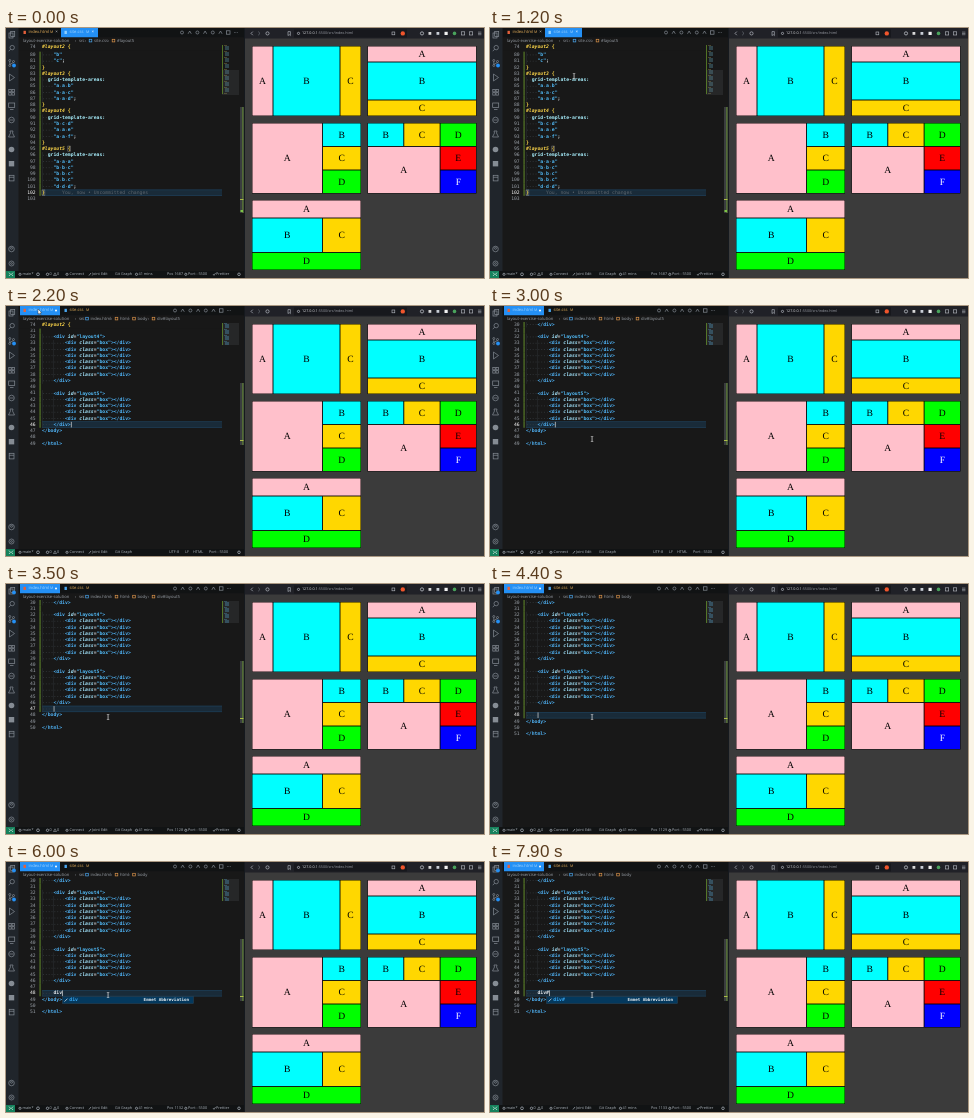
Write an HTML page with a canvas that moves like this. It is 478 px wide and 250 px high and loops after 8 s.

```html
<!DOCTYPE html>
<html lang="en">
<head>
<meta charset="utf-8">
<title>Grid layout exercise</title>
<style>
html, body { margin: 0; width: 100%; height: 100%; overflow: hidden; background: #181818; }
canvas { display: block; width: 478px; height: 250px; }
</style>
</head>
<body>
<canvas id="stage"></canvas>
<script>
const W = 478, H = 250, LOOP = 8000;
const canvas = document.getElementById('stage');
const ctx = canvas.getContext('2d');
const dpr = window.devicePixelRatio || 1;
canvas.width = W * dpr;
canvas.height = H * dpr;

const MONO = '"DejaVu Sans Mono", monospace';
const SANS = '"Open Sans", "Noto Sans", sans-serif';
const SERIF = '"Liberation Serif", serif';
const CHAR = 2.87, LINE = 6.27, LEFT = 36;
const col = {
  editor: '#181818', bar: '#20252b', line: '#1f4766', num: '#9aa0a8', dim: '#5c666e',
  tag: '#4fb2f5', attr: '#a3e6ff', str: '#52bdfa', sel: '#ffd84a', prop: '#a6ecfa',
  text: '#dfe5ea', icon: '#858c94', blue: '#2490f5', git: '#6b9a2c'
};

const rect = (x, y, w, h, c) => { ctx.fillStyle = c; ctx.fillRect(x, y, w, h); };

function text(s, x, y, c, font, align = 'left') {
  ctx.font = font;
  ctx.fillStyle = c;
  ctx.textAlign = align;
  ctx.textBaseline = 'middle';
  ctx.fillText(s, x, y);
}
const ui = (s, x, y, c = col.num, size = 4.1) => text(s, x, y, c, `${size}px ${SANS}`);

function code(s, column, y, c, style = 'bold') {
  text(s, LEFT + column * CHAR, y, c, `${style} 4.77px ${MONO}`);
}

function path(points, c, width = 0.7, fill) {
  ctx.beginPath();
  points.forEach(([x, y], i) => i ? ctx.lineTo(x, y) : ctx.moveTo(x, y));
  if (fill) { ctx.closePath(); ctx.fillStyle = fill; ctx.fill(); }
  if (c) { ctx.strokeStyle = c; ctx.lineWidth = width; ctx.stroke(); }
}

function ring(x, y, r, c, fill) {
  ctx.beginPath();
  ctx.arc(x, y, r, 0, Math.PI * 2);
  if (fill) { ctx.fillStyle = c; ctx.fill(); }
  else { ctx.strokeStyle = c; ctx.lineWidth = 0.7; ctx.stroke(); }
}

function frame(x, y, w, h, c, width = 0.7) {
  ctx.strokeStyle = c;
  ctx.lineWidth = width;
  ctx.strokeRect(x, y, w, h);
}

// ---- documents ----
function rule(n, rows) {
  return [`#layout${n} {`, '  grid-template-areas:',
    ...rows.map((r, i) => `    "${r}"${i === rows.length - 1 ? ';' : ''}`), '}'];
}
const css = ['    "b"', '    "c";', '}',
  ...rule(3, ['a a b', 'a a c', 'a a d']),
  ...rule(4, ['b c d', 'a a e', 'a a f']),
  ...rule(5, ['a a a', 'b b c', 'b b c', 'b b c', 'd d d']), ''];

function block(n, count) {
  return [`    <div id="layout${n}">`,
    ...Array(count).fill('        <div class="box"></div>'), '    </div>'];
}
function markup(extra) {
  return ['    </div>', '', ...block(4, 6), '', ...block(5, 4), ...extra, '</body>', '', '</html>'];
}

// ---- syntax colours ----
const tokens = /(<\/?\w+|\/?>)|(#\w+)|("[^"]*")|([\w-]+(?==))|([\w-]+:)|(\S)/g;
const shades = [col.tag, col.sel, col.str, col.attr, col.prop, col.text];
const dot = (column, y, c) => rect(LEFT + (column + 0.35) * CHAR, y - 0.3, 0.8, 0.8, c);

function codeLine(s, y) {
  const indent = s.length - s.trimStart().length;
  for (let i = 0; i < indent; i++) dot(i, y, '#3a4045');
  for (let i = 0; i < indent; i += 4) rect(LEFT + i * CHAR, y - LINE / 2, 0.4, LINE, '#34393d');
  if (/^ +div/.test(s)) return code(s.trim(), indent, y, col.text);
  for (const m of s.matchAll(tokens)) {
    const kind = m.slice(1).findIndex(Boolean);
    const italic = kind === 1 || kind === 3;
    const c = m[0] === '{' || m[0] === '}' ? col.sel : shades[kind];
    code(m[0], m.index, y, c, italic ? 'italic bold' : 'bold');
    if (kind === 2) [...m[0]].forEach((ch, i) => {
      if (ch === ' ') dot(m.index + i, y, '#3b7396');
    });
  }
}

function lineNumber(n, y, active) {
  text(n, 29.6, y, active ? '#ffffff' : col.num, `4.7px ${MONO}`, 'right');
}

function drawCode(lines, first, top, active) {
  lines.forEach((s, i) => {
    const n = first + i, y = top + i * LINE;
    if (n === active) {
      rect(LEFT, y - 3.1, 180, 6.2, '#192b39');
      rect(LEFT, y - 3.1, 180, 0.5, col.line);
      rect(LEFT, y + 2.7, 180, 0.5, col.line);
    }
    if (n <= active) rect(33.6, y - LINE / 2, 0.9, LINE, col.git);
    lineNumber(n, y, n === active);
    codeLine(s, y);
  });
}

const caret = (column, y) => rect(LEFT + column * CHAR + 0.2, y - 2.8, 0.7, 5.6, '#d8d8d8');
const bracket = (column, y) => frame(LEFT + column * CHAR, y - 2.8, CHAR, 5.6, '#8a8a8a', 0.5);

function sticky() {
  rect(13, 16, 203, 6.6, col.editor);
  lineNumber(74, 19, false);
  codeLine('#layout2 {', 19);
}

// ---- editor chrome ----
function activityBar(unsaved) {
  rect(0, 0, 12.5, 243, col.bar);
  const c = col.icon, x = 5.5;
  frame(3, 5, 4, 5, c); frame(4.7, 3.4, 4, 5, c);
  if (unsaved) ring(8, 8.5, 1.9, col.blue, true);
  ring(6.2, 19.6, 2.2, c); path([[4.6, 21.2], [2.8, 23.2]], c);
  ring(3.8, 32.5, 1, c); ring(3.8, 37.5, 1, c); ring(7.5, 33.5, 1, c);
  path([[3.8, 33.5], [3.8, 36.5], [7.5, 34.5]], c);
  ring(8, 37.5, 1.9, col.blue, true);
  path([[3.5, 46], [8.5, 49.5], [3.5, 53], [3.5, 46]], c);
  for (const [dx, dy] of [[0, 0], [3.2, 0], [0, 3.2], [3.2, 3.2]]) frame(2.8 + dx, 61.5 + dy, 2.4, 2.4, c);
  frame(2.7, 75, 6, 4.5, c); path([[4, 81.5], [7.5, 81.5]], c);
  ring(x, 92, 2.8, c); path([[3.5, 92], [7.5, 92]], c);
  path([[4, 103], [7, 103], [6.5, 105], [8.5, 109], [2.5, 109], [4.5, 105], [4, 103]], c);
  ring(x, 121.5, 2.8, c, true);
  rect(2.8, 133, 5.4, 5.4, c);
  frame(3.2, 147.3, 4.8, 5.6, c); path([[3.2, 149.3], [8, 149.3]], c);
  ring(x, 221, 2.8, c); ring(x, 220.3, 1, c);
  ring(x, 235.5, 2.5, c); ring(x, 235.5, 0.9, c);
}

function tabs(html, hover) {
  rect(12.5, 0, 225.5, 9.5, '#111314');
  if (html) rect(14, 0, 40, 9.5, col.blue);
  else rect(55, 0, 37, 9.5, col.blue);
  if (hover && !html) rect(14, 0, 41, 9.5, '#252a2e');
  const lit = '#a4d6ff', changed = '#e8b05a';
  rect(17.5, 2.8, 2.4, 3.2, '#e5603a');
  ui('index.html', 22.5, 4.3, html ? lit : changed, 4.2);
  ui('M', 44, 4.3, html ? lit : changed, 3.6);
  if (html) ring(50, 4.4, 1, '#ffffff', true);
  else ui('×', 49.3, 4.3, '#c8ccd0', 4.5);
  rect(58.5, 2.8, 2.4, 3.2, html ? '#4aa6ee' : '#8fd0ff');
  ui('site.css', 63.5, 4.3, html ? changed : lit, 4.2);
  ui('M', 80, 4.3, html ? changed : lit, 3.6);
  if (!html) ui('×', 85.5, 4.3, '#ffffff', 4.5);
  const start = html ? 169 : 176;
  for (let i = 0; i < 8; i++) {
    const x = start + i * 7.7;
    if (i === 6) frame(x - 1.6, 2.8, 3.4, 3.4, col.icon);
    else if (i === 7) for (let d = -1.4; d < 2; d += 1.4) ring(x + d, 4.5, 0.4, col.icon, true);
    else if (i % 2) path([[x - 1.6, 5.8], [x, 3], [x + 1.6, 5.8]], col.icon);
    else ring(x, 4.5, 1.5, col.icon);
  }
}

function breadcrumb(parts) {
  rect(12.5, 9.5, 225, 6.5, col.editor);
  parts.forEach(([s, x], i) => {
    if (i) ui('›', x - (i > 1 ? 9 : 4.3), 12.6);
    if (i > 1) frame(x - 4.8, 11.3, 2.6, 2.6, i === 2 ? '#4aa6ee' : '#d9924a');
    ui(s, x, 12.7, col.num, 4.2);
  });
}

function statusBar(pos) {
  rect(0, 243, 238, 7, '#111314');
  const y = 246.3, c = '#aeb5bd';
  rect(0, 243, 9, 7, '#16825d');
  path([[3, 244.6], [4.5, 246.3], [3, 248]], '#ffffff', 0.6);
  path([[7, 244.6], [5.5, 246.3], [7, 248]], '#ffffff', 0.6);
  ring(14, y, 1.1, c);
  const items = [['main*', 16.5], ['0', 43.5], ['0', 51], ['Connect', 63.5],
    ['Joint Edit', 86], ['Git Graph', 109]];
  if (pos) items.push(['41 mins', 132.5], [`Pos ${pos}`, 161], ['Port : 5500', 182], ['Prettier', 210]);
  else items.push(['UTF-8', 163], ['LF', 179], ['HTML', 187], ['Port : 5500', 203]);
  items.forEach(([s, x]) => ui(s, x, y, c, 3.8));
  ring(32, y, 1.4, c);
  ring(41.5, y, 1.2, c);
  path([[47.5, 247.5], [49, 244.8], [50.5, 247.5], [47.5, 247.5]], c, 0.5);
  ring(61, y, 1.1, c);
  path([[83, 247.5], [85, 245]], c);
  if (pos) {
    ring(130.5, y, 1.1, c);
    ring(179.8, y, 1.1, c);
    path([[207, 246], [208, 247.4], [209.6, 245]], c, 0.6);
  }
  ring(233, y, 1.3, c);
}

function minimap(html) {
  const rows = html ? 22 : 49;
  for (let i = 0; i < rows; i++) {
    if (i % 6 === 5) continue;
    const head = i % 6 === 0;
    rect(218 + (head ? 0 : 1), 17 + i, head ? 3 : 4 + (i * 3) % 3, 0.5,
      html ? '#3a7797' : head ? '#7d7440' : '#46717c');
  }
  rect(216, html ? 17 : 42, 17, html ? 22 : 25, 'rgba(130,140,150,.13)');
  rect(216, 17, 0.7, rows, col.git);
  rect(234, html ? 77 : 79, 4, html ? 62 : 106, '#3a3d3f');
  rect(236.5, html ? 77 : 79, 0.8, html ? 62 : 106, col.git);
  rect(234, html ? 134 : 171, 3.5, 0.9, '#b9c94a');
  if (!html) rect(234.5, 182, 2.5, 2, '#7cc447');
}

function popup(word, y) {
  rect(56.5, y, 131, 7, '#04395e');
  frame(56.5, y, 131, 7, '#2c4456', 0.5);
  path([[58.5, y + 5], [61.5, y + 2]], '#d0d8e0', 0.8);
  text(word, 63.3, y + 3.5, '#3aa9f5', `bold 4.77px ${MONO}`);
  text('Emmet Abbreviation', 183, y + 3.5, '#e4ebf0', `bold 4.2px ${MONO}`, 'right');
}

// ---- browser ----
const fills = { A: '#ffc0cb', B: '#00ffff', C: '#ffd700', D: '#00ff00', E: '#ff0000', F: '#0000ff' };

function grid(x, y, cells) {
  cells.forEach(([name, x0, y0, x1, y1]) => {
    const w = x1 - x0, h = y1 - y0, edge = 0.45;
    rect(x + x0, y + y0, w, h, '#000000');
    rect(x + x0 + edge, y + y0 + edge, w - 2 * edge, h - 2 * edge, fills[name]);
    text(name, x + (x0 + x1) / 2, y + (y0 + y1) / 2 + 0.3,
      name === 'F' ? '#ffffff' : '#000000', `9.6px ${SERIF}`, 'center');
  });
}

function browser() {
  rect(238, 0, 240, 250, '#3b3b3b');
  rect(238, 0, 1, 250, '#15191e');
  rect(239, 0, 239, 10.5, '#202127');
  const c = '#b8bcc4';
  path([[246.8, 3.6], [245, 5.4], [246.8, 7.2]], c);
  path([[252.2, 3.6], [254, 5.4], [252.2, 7.2]], '#6e737c');
  ring(261.5, 5.4, 1.6, c);
  path([[282, 3.6], [284.4, 3.6], [284.4, 7.6], [283.2, 6.5], [282, 7.6], [282, 3.6]], c, 0.6);
  rect(288, 1.5, 113, 8, '#17181d');
  ring(292.5, 5.4, 1.1, c);
  ui('127.0.0.1', 296, 5.3, '#e6e8ec', 3.7);
  ui(':5500/src/index.html', 311.7, 5.3, '#9a9ea6', 3.7);
  frame(386, 4, 2.8, 2.8, c, 0.6);
  ring(396.8, 5.4, 2.2, '#f0552c', true);
  ring(416, 5.4, 1.6, '#cfd3da');
  rect(422.5, 4, 2.8, 2.8, '#d8d8d8');
  rect(430.5, 4, 2.8, 2.8, '#c9ced6');
  rect(438.5, 3.8, 3.2, 3.2, '#f2f2f2');
  ring(448.5, 5.4, 1.8, '#49a35c', true);
  frame(455.5, 3.8, 3.2, 3.2, c, 0.6);
  frame(463.5, 3.8, 3.2, 3.2, c, 0.6);
  for (const y of [3.8, 5.2, 6.6]) rect(472, y, 3.4, 0.5, c);

  grid(246, 18, [['A', 0, 0, 21, 70], ['B', 21, 0, 88, 70], ['C', 88, 0, 109, 70]]);
  grid(361.5, 18, [['A', 0, 0, 109, 16], ['B', 0, 16, 109, 54], ['C', 0, 54, 109, 70]]);
  grid(246, 95, [['A', 0, 0, 70.5, 70.5], ['B', 70.5, 0, 109, 23.5],
    ['C', 70.5, 23.5, 109, 47], ['D', 70.5, 47, 109, 70.5]]);
  grid(361.5, 95, [['B', 0, 0, 36.3, 23.5], ['C', 36.3, 0, 72.6, 23.5], ['D', 72.6, 0, 109, 23.5],
    ['A', 0, 23.5, 72.6, 70.5], ['E', 72.6, 23.5, 109, 47], ['F', 72.6, 47, 109, 70.5]]);
  grid(246, 172, [['A', 0, 0, 109, 18], ['B', 0, 18, 70.5, 52.5],
    ['C', 70.5, 18, 109, 52.5], ['D', 0, 52.5, 109, 70]]);
}

// ---- mouse ----
const route = [[500, 150, 140], [1000, 84, 48], [1200, 84, 48], [1700, 32, 4],
  [2200, 32, 4], [2500, 76, 122], [2900, 76, 122], [3000, 102, 133]];

function mouse(t) {
  if (t < route[0][0]) return;
  let [, x, y] = route[route.length - 1];
  for (let i = 1; i < route.length; i++) {
    const [t0, x0, y0] = route[i - 1], [t1, x1, y1] = route[i];
    if (t < t1) {
      const p = (t - t0) / (t1 - t0), k = p * p * (3 - 2 * p);
      x = x0 + (x1 - x0) * k;
      y = y0 + (y1 - y0) * k;
      break;
    }
  }
  if (y < 16) {
    path([[x, y - 1], [x, y + 4.2], [x + 1.2, y + 3.2], [x + 2, y + 5],
      [x + 2.9, y + 4.6], [x + 2.1, y + 2.9], [x + 3.7, y + 2.8]], '#111', 0.4, '#ffffff');
  } else {
    rect(x - 0.3, y - 2.3, 0.7, 4.8, '#e6e6e6');
    rect(x - 1.2, y - 2.6, 2.5, 0.5, '#e6e6e6');
    rect(x - 1.2, y + 2.2, 2.5, 0.5, '#e6e6e6');
  }
}

// ---- timeline ----
const typing = [[5500, 'd'], [5700, 'di'], [5900, 'div'], [7700, 'div#']];
const blinkOff = [[4100, 4400], [4900, 5400], [6300, 6700], [7300, 7700]];

function draw(t) {
  ctx.setTransform(dpr, 0, 0, dpr, 0, 0);
  ctx.textRendering = 'geometricPrecision';
  rect(0, 0, W, H, col.editor);
  const html = t >= 2200, enter = t >= 3500, second = t >= 4400;
  const word = typing.reduce((w, [at, s]) => t >= at ? s : w, '');
  const on = !blinkOff.some(([a, b]) => t >= a && t < b);
  const top = html ? 18.3 : 26.8;
  const active = !html ? 102 : second ? 48 : enter ? 47 : 46;

  if (html) {
    const extra = second ? ['', '    ' + word] : enter ? ['    '] : [];
    drawCode(markup(extra), 30, top, active);
    if (on) caret(enter ? 4 + word.length : 10, top + (active - 30) * LINE);
    if (t < 2300) sticky();
  } else {
    const y = top + 22 * LINE;
    drawCode(css, 80, top, active);
    code('You, now • Uncommitted changes', 7, y, col.dim, '');
    bracket(9, top + 15 * LINE);
    bracket(0, y);
    sticky();
  }
  minimap(html);
  tabs(html, t >= 1700);
  const crumbs = [['layout-exercise-solution', 17], ['src', 73]];
  if (html) {
    crumbs.push(['index.html', 84.5], ['html', 114], ['body', 131.5]);
    if (t < 3900) crumbs.push(['div#layout5', 151]);
  } else crumbs.push(['site.css', 88], ['#layout5', 111]);
  breadcrumb(crumbs);
  activityBar(enter);
  statusBar(!html ? 1687 : !enter ? 0 : !second ? 1128 : 1129 + word.length);
  if (t >= 5900) popup(t >= 7800 ? 'div#' : 'div', 134.6);
  browser();
  mouse(t);
}

function tick() {
  const t = performance.now() % LOOP;
  draw(Math.floor(t / 100) * 100);
  requestAnimationFrame(tick);
}
tick();
</script>
</body>
</html>
```
